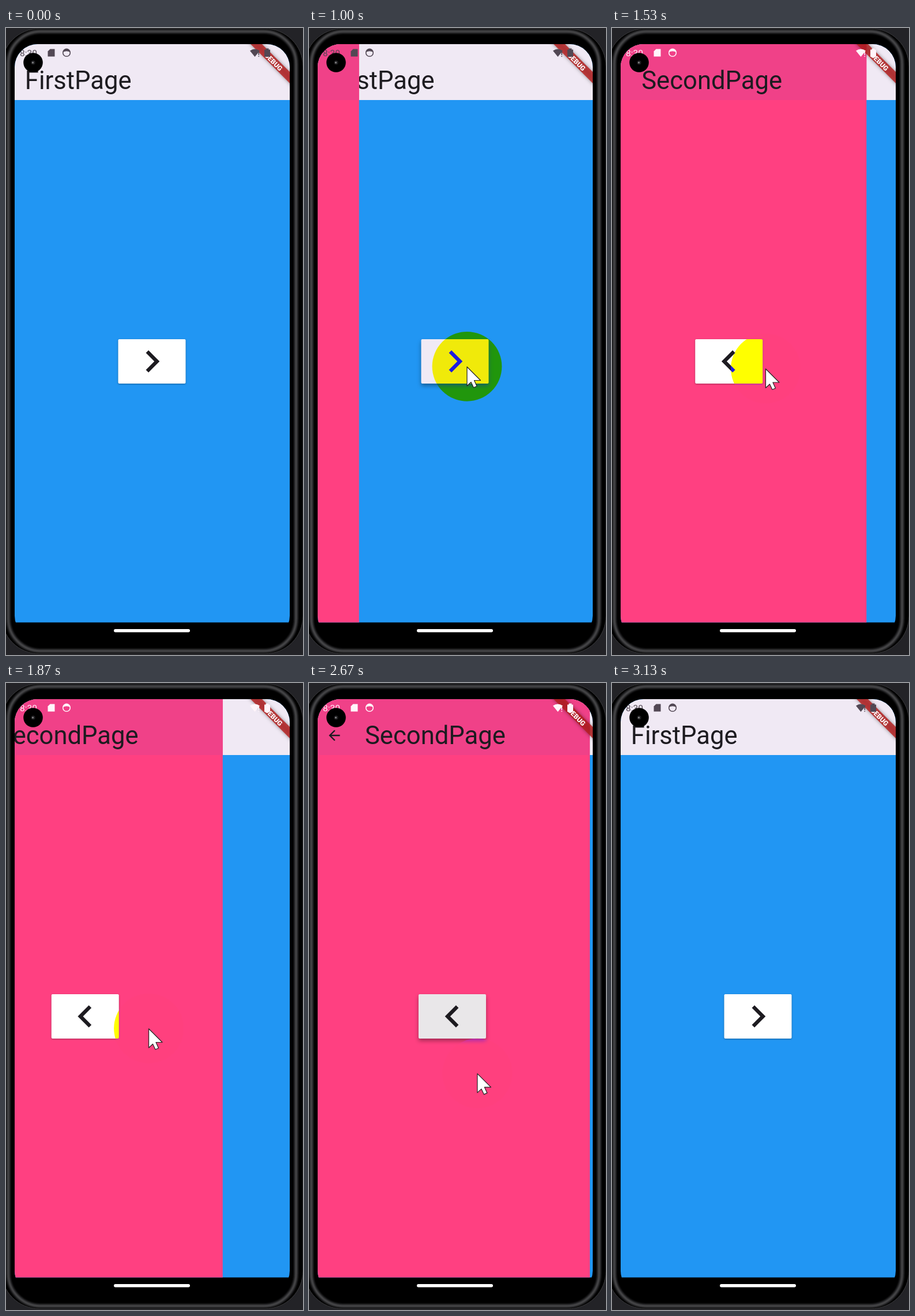
Recreate the animation shown at these times as an HTML page. Size 515 by 1088 pixels, loop 4.14 s.

```html
<!DOCTYPE html>
<html lang="en">
<head>
<meta charset="utf-8">
<title>Bouncing page transition</title>
<style>
  html, body { margin: 0; width: 100%; height: 100%; overflow: hidden; background: #232327; }
  svg { display: block; width: 515px; height: 1088px; }
  text { font-family: Roboto, "Open Sans", sans-serif; }
  .title { font-size: 43.6px; fill: #1d1b20; }
  .rim { filter: blur(1px); }
  .band { filter: drop-shadow(0 0 3px rgba(0, 0, 0, .5)); }
  #halo { mix-blend-mode: difference; }
</style>
</head>
<body>
<svg viewBox="0 0 515 1088">
  <defs>
    <clipPath id="screen"><rect x="15" y="28" width="477" height="1032" rx="40"/></clipPath>
    <clipPath id="pages"><rect x="15" y="28" width="477" height="1003.5"/></clipPath>
    <path id="chevron" d="M10 6 8.59 7.41 13.17 12 8.59 16.59 10 18 16 12Z"
      transform="translate(253.5 578.5) scale(3.2) translate(-12 -12)" fill="#1d1b20"/>
  </defs>

  <!-- Phone body -->
  <rect width="515" height="1088" fill="#232327"/>
  <g fill="none">
    <rect x="-8" y="1" width="523" height="1085" rx="66" fill="#000" stroke="#3a3a3c"/>
    <g class="rim">
      <rect x="4" y="6" width="499" height="1075" rx="56" stroke="#242426" stroke-width="8"/>
      <rect x="4" y="6" width="499" height="1075" rx="56" stroke="#4c4c4e" stroke-width="3"/>
    </g>
  </g>

  <g clip-path="url(#screen)">
    <rect x="15" y="28" width="477" height="1032"/>
    <g clip-path="url(#pages)">
      <g>
        <rect x="15" y="28" width="477" height="1004" fill="#2196f3"/>
        <rect x="15" y="28" width="477" height="97" fill="#f0e9f4"/>
        <text class="title" x="32.8" y="106">FirstPage</text>
        <rect id="next" x="194.5" y="540" width="117" height="77" rx="2"/>
        <use href="#chevron"/>
      </g>
      <g id="second">
        <rect x="15" y="28" width="477" height="1004" fill="#ff4081"/>
        <rect x="15" y="28" width="477" height="97" fill="#f04188"/>
        <path d="M20 11H7.83l5.59-5.59L12 4l-8 8 8 8 1.41-1.41L7.83 13H20z" fill="#1d1b20"
          transform="translate(49 91) scale(1.2) translate(-12 -12)"/>
        <text class="title" x="102" y="106">SecondPage</text>
        <rect id="back" x="195" y="540" width="117" height="77" rx="2"/>
        <use href="#chevron" transform="translate(507 0) scale(-1 1)"/>
      </g>
    </g>

    <!-- Corner ribbon -->
    <g transform="translate(492 28) rotate(45)">
      <rect class="band" x="-60" y="34" width="120" height="14" fill="rgba(183,28,28,.8)"/>
      <text x="2" y="45.8" font-size="11.8" font-weight="900" fill="#fff" text-anchor="middle">DEBUG</text>
    </g>

    <!-- Status bar -->
    <g id="left">
      <text x="24" y="48.5" font-size="15.5">8:30</text>
      <path d="M76.5 36.5H84.5V49.5H72.5V40.5Z"/>
      <circle cx="105" cy="43" r="6.3" fill="none" stroke="currentColor" stroke-width="1.6"/>
      <path d="M98.5 42A6.5 6.5 0 0 1 111.5 42Q105 38.5 98.5 42Z"/>
    </g>
    <g id="right">
      <path d="M423 39.5Q431.5 33.5 440 39.5L431.5 50Z"/>
      <path d="M437.5 41H439V47H437.5ZM437.5 48.5H439V50H437.5Z"/>
      <path d="M450.500 35.5H455.5V37.5H458V50H448V37.5H450.5Z"/>
    </g>
  </g>

  <circle cx="47" cy="60" r="16.8"/>
  <circle cx="47" cy="60" r="3.5" fill="#222224"/>
  <circle cx="46.5" cy="60" r="1.5" fill="#8a8a8c"/>
  <rect x="187" y="1043" width="132" height="5.5" rx="2.7" fill="#fff"/>

  <g id="pointer">
    <circle id="halo" cy="-.7" r="60.4" fill="#00f"/>
    <path id="arrow" d="M0 0V33L7 26.5 11.5 36 17 33.5 12.5 23.5H23.5Z"
      fill="#fff" stroke="#222" stroke-width="1.2" stroke-linejoin="round"/>
  </g>
</svg>

<script>
const LOOP = 4140, TICK = 200 / 3;
const PUSH = 718, PUSH_TIME = 2000, POP = 2665, POP_TIME = 300;
const $ = id => document.getElementById(id);

// Pointer stops: time, x, y
const path = [
  [60, 372, 800], [200, 322, 690], [330, 286, 612], [460, 274, 588],
  [1400, 274, 588], [1860, 248, 600], [2130, 229, 600], [2400, 229, 600],
  [2667, 292, 678], [2870, 345, 778], [3070, 400, 900]
];

const clamp = v => Math.min(1, Math.max(0, v));
const ramp = (t, from, to) => clamp((t - from) / (to - from));
const mix = (a, b, k) => a + (b - a) * k;
const rgb = (a, b, k) => `rgb(${a.map((v, i) => Math.round(mix(v, b[i], k)))})`;

function bounce(t) {
  const arcs = [[1, 0, 0], [2, 1.5, .75], [2.5, 2.25, .9375], [2.75, 2.625, .984375]];
  const [, mid, low] = arcs.find(a => t * 2.75 <= a[0]) || arcs[3];
  return 7.5625 * (t - mid / 2.75) ** 2 + low;
}

function slide(t) {
  return t < POP
    ? bounce(clamp((t - PUSH) / PUSH_TIME))
    : bounce(clamp(.986 - (t - POP) / POP_TIME));
}

function pointerAt(t) {
  const i = Math.max(1, path.findIndex(p => p[0] >= t));
  const [a, b] = [path[i - 1], path[i]];
  const k = ramp(t, a[0], b[0]);
  return [mix(a[1], b[1], k), mix(a[2], b[2], k)];
}

function tint(id, light) {
  const color = rgb([82, 72, 84], [255, 245, 250], light);
  $(id).setAttribute("fill", color);
  $(id).setAttribute("color", color);
}

// A pressed button darkens and rises
function press(id, color, k) {
  $(id).setAttribute("fill", rgb([255, 255, 255], color, k));
  $(id).style.filter = `drop-shadow(0 ${1.5 + 2.5 * k}px ${1.5 + 2 * k}px rgba(0, 0, 0, .35))`;
}

function draw(t) {
  const p = slide(t);
  $("second").setAttribute("transform", `translate(${-477 * (1 - p)} 0)`);
  $("second").style.display = p > 0 ? "" : "none";

  press("next", [240, 234, 245], ramp(t, 600, 720) - ramp(t, 1050, 1250));
  press("back", [233, 231, 233], ramp(t, 2400, 2560));

  const restore = ramp(t, 2800, 2930);
  const fade = ramp(t, 1200, 1330) - restore;
  tint("left", fade);
  $("left").setAttribute("opacity", 1 - .7 * Math.sin(Math.PI * fade));
  tint("right", ramp(t, 1300, 1400) - restore);

  const shown = t >= path[0][0] && t <= path[path.length - 1][0];
  $("pointer").style.display = shown ? "" : "none";
  if (shown) {
    const [x, y] = pointerAt(t);
    for (const id of ["halo", "arrow"]) $(id).setAttribute("transform", `translate(${x} ${y})`);
  }
}

const start = performance.now();
function frame() {
  const t = (performance.now() - start) % LOOP;
  draw(Math.floor((t + 4) / TICK) * TICK); // 15 steps a second
  requestAnimationFrame(frame);
}
frame();
</script>
</body>
</html>
```
